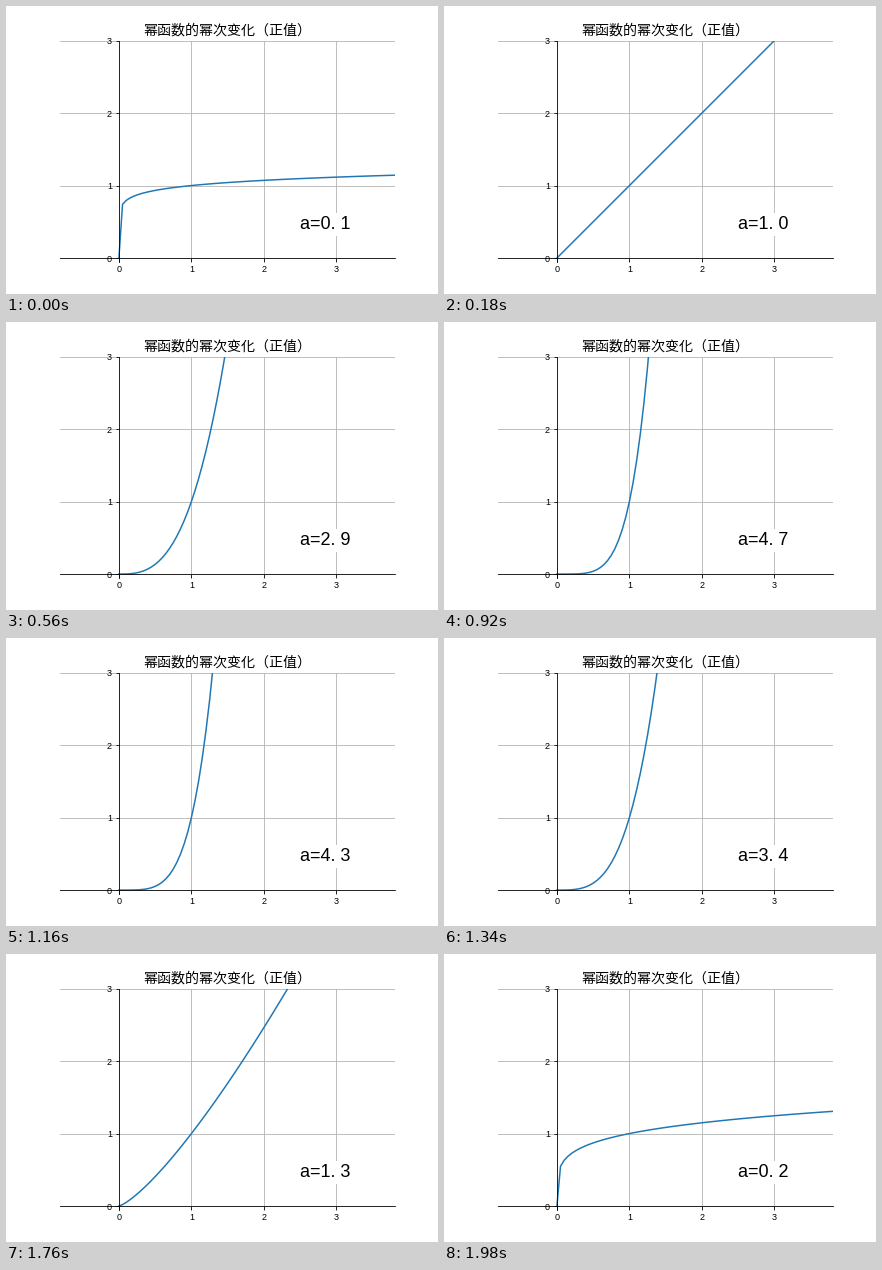
A matplotlib script that plays this animation: 432 by 288 pixels, repeating every 2 s.

```python
import numpy as np
import matplotlib.pyplot as plt
from matplotlib.animation import FuncAnimation

FRAMES = 100
PEAK = FRAMES // 2
UNIT = 72.5  # pixels per data unit on both axes

plt.rcParams["font.family"] = "Liberation Sans"

fig = plt.figure(figsize=(6, 4), dpi=72)
ax = fig.add_axes([0.125, 0.11, 0.775, 0.77])

width, height = 0.775 * 432, 0.77 * 288
left = -58.9 / UNIT
ax.set_xlim(left, left + width / UNIT)
ax.set_ylim(3 - height / UNIT, 3)
ax.set_xticks(range(4))
ax.set_yticks(range(4))
ax.tick_params(labelsize=9)
ax.grid(True)

for side in ("top", "right"):
    ax.spines[side].set_visible(False)
for side in ("bottom", "left"):
    ax.spines[side].set_position(("data", 0))

ax.set_title("幂函数的幂次变化（正值）", fontsize=14, family="Noto Sans CJK JP")

x = np.arange(0, 5, 0.05)
curve, = ax.plot(x, x, lw=1.5, color="#1f77b4")
label = ax.text(2.5, 0.4, "", fontsize=18,
                bbox=dict(facecolor="white", edgecolor="none", pad=3))


def update(i):
    # exponent climbs 0.1 -> 5.1, then falls back
    a = (PEAK + 1 - abs(PEAK - i)) / 10
    curve.set_ydata(x ** a)
    label.set_text(f"a={a:.1f}".replace(".", ". "))
    return curve, label


anim = FuncAnimation(fig, update, frames=FRAMES, interval=20, repeat=True,
                     repeat_delay=0)
plt.show()
```
